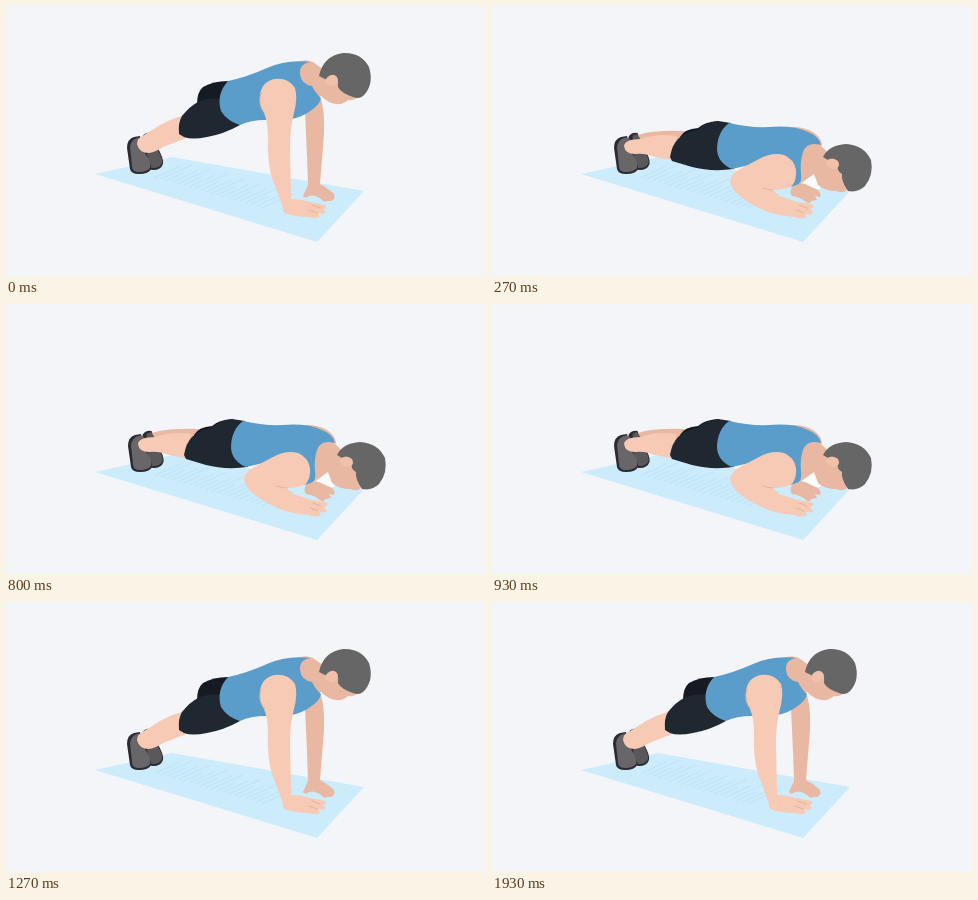
These frames come from a looping animation (480 px wide and 270 px high, 2070 ms). An HTML page:

```html
<!DOCTYPE html>
<html lang="en">
<head>
<meta charset="utf-8">
<title>Push-up</title>
<style>
  html, body { margin: 0; width: 100%; height: 100%; overflow: hidden; background: #f4f5f9; }
  svg { display: block; width: 100%; height: 100%; }
  .skin { fill: #f6cab4; }
  .shade { fill: #e9b8a2; }
  .ear { fill: #f0c1aa; }
  .shirt { fill: #5a9dca; }
  .shorts { fill: #1f2730; }
  .back { fill: #161b23; }
  .hair { fill: #666667; }
  .shoe { fill: #69666a; }
  .far { fill: #5a585b; }
  .sole { fill: #2b2b33; }
  .crease { fill: none; stroke: #e6b39c; stroke-width: 1; stroke-linecap: round; }
</style>
</head>
<body>
<svg viewBox="0 0 480 270">
  <defs>
    <g id="farShoe">
      <path class="sole" d="M136 131Q139 126 145 127L151 141Q158 152 157 158Q155 164 147 164L140 163Z"/>
      <path class="far" d="M140 130Q145 126 148 131L151 143Q157 152 156 157Q154 162 147 162L142 161Z"/>
    </g>
    <g id="nearShoe">
      <path class="sole" d="M121 142Q121 133 128 131L134 130L137 145Q146 157 145 163Q143 168 133 168Q125 168 124 163Z"/>
      <path class="shoe" d="M124 141Q125 134 131 132Q136 130 138 135Q137 144 140 149Q146 157 144 162Q141 166 133 166Q126 166 126 160Z"/>
    </g>
  </defs>

  <path d="M89 168L166 151L358 185L311 236Z" fill="#cdecfb"/>
  <g id="hatch" fill="none" stroke="#bde4f7" stroke-width="2" stroke-linecap="round" opacity=".6"></g>

  <g id="up">
    <use href="#farShoe"/>
    <use href="#nearShoe"/>
    <path class="shade" d="M299 106L315 93Q319 108 318 128L314 178Q323 183 328 188Q330 193 325 195L321 195Q318 197 315 193Q309 188 303 190Q299 193 297 190L302 179L301 150Z"/>
    <path class="back" d="M191 98Q191 86 197 81Q207 75 222 75L222 105L202 112Z"/>
    <path class="skin" d="M131 138Q131 132 138 129Q148 123 154 119Q165 113 178 109L183 131L157 141Q150 146 143 147Q133 147 131 138Z"/>
    <path class="shorts" d="M173 128Q172 116 176 110Q184 100 192 96Q202 91 215 93L234 119Q218 128 201 131Q186 134 178 131Z"/>
    <path class="shade" d="M290 57Q298 52 307 56L318 64L331 68Q337 76 341 84L351 92Q346 95 342 94Q337 99 330 98Q322 97 315 90L309 94L292 76Z"/>
    <path class="shirt" d="M222 75Q241 71 261 62Q281 53 304 56Q293 58 294 68Q295 78 306 80Q310 88 315 92Q314 98 307 103Q297 111 285 113L259 114Q245 114 234 119Q221 115 215 105Q210 88 222 75Z"/>
    <path class="hair" d="M313 70Q317 50 337 47Q355 46 363 61Q368 77 359 88Q354 94 347 91Q335 87 332 81Q333 70 328 69Q323 68 323 74Q318 73 313 70Z"/>
    <path class="ear" d="M319 77Q320 69 327 69Q333 70 331 76Q329 81 324 80Z"/>
    <path class="skin" d="M254 94Q253 77 268 73Q282 71 289 82Q292 92 288 107Q284 121 284 142L285 193Q295 193 304 196L319 199Q322 202 317 203L320 206Q318 209 312 207L314 211Q308 213 303 211Q291 211 281 208Q276 207 277 202Q272 187 266 172Q261 155 262 132Q262 116 258 107Q254 101 254 94Z"/>
    <path class="crease" d="M255 87Q251 99 259 107M306 199L314 202M303 204L311 207"/>
  </g>

  <g id="down">
    <use href="#farShoe" x=".5"/>
    <use href="#nearShoe" x="1"/>
    <path class="shade" d="M146 129Q161 124 193 125L187 144L154 143Z"/>
    <path class="back" d="M188 131Q192 123 206 122Q212 116 227 115L231 142L194 149Z"/>
    <path class="skin" d="M132 140Q133 133 149 133Q165 127 185 130L181 154Q164 152 157 149Q149 147 143 148Q133 148 132 140Z"/>
    <path class="shorts" d="M178 151Q180 139 186 133Q192 127 205 124Q213 117 226 115L239 117L242 163Q219 166 200 161L180 155Z"/>
    <path class="shade" d="M292 122Q308 119 321 126Q330 132 330 140L314 137Z"/>
    <path d="M311 174L320 168L329 177L328 183Q317 184 311 178Z" fill="#fbfcfe"/>
    <path class="shade" d="M309 141Q319 134 329 140L345 155L356 183Q352 188 344 185Q333 185 326 179L322 168L308 178Z"/>
    <path class="shade" d="M300 181Q307 176 313 178L326 184Q330 188 328 191L323 190L325 194L319 195Q318 199 314 196Q308 191 300 190Q297 187 300 181Z"/>
    <path class="shirt" d="M237 117Q258 122 277 121Q301 119 316 126Q327 130 329 139Q315 135 311 146Q308 154 309 168Q310 175 307 178L299 181Q290 160 266 157L240 163Q226 157 225 144Q225 126 237 117Z"/>
    <path class="hair" d="M331 151Q337 139 354 138Q372 139 379 154Q382 169 373 180Q366 187 356 185Q349 175 350 168Q344 165 346 157Q342 152 336 154Z"/>
    <path class="ear" d="M334 155Q340 150 346 155Q349 161 343 163Q337 163 334 158Z"/>
    <path class="skin" d="M238 175Q239 168 248 163L267 153Q280 146 292 149Q302 153 304 164Q305 173 300 180Q292 184 281 184L287 190Q297 193 305 196L320 198Q324 201 318 203L321 207Q318 210 313 207L315 211Q309 214 303 211Q288 210 276 206Q259 199 248 190Q239 183 238 175Z"/>
    <path class="crease" d="M271 182Q276 184 281 184M307 199L315 202M304 204L312 207"/>
  </g>
</svg>
<script>
  const LOOP = 2070, DROP = 270, RISE = 1270;
  const up = document.getElementById("up");
  const down = document.getElementById("down");

  // Slanted scribble along the middle of the mat
  let strokes = "";
  for (let i = 0; i < 20; i++) {
    const x = 150 + i * 5.6, y = 171 + i * 1.6;
    const len = 24 + 8 * Math.sin(i * 2.1);
    strokes += `M${x} ${y}l${len} ${-len * 0.45}`;
  }
  const line = document.createElementNS("http://www.w3.org/2000/svg", "path");
  line.setAttribute("d", strokes);
  document.getElementById("hatch").append(line);

  function draw(now) {
    const t = now % LOOP;
    const low = t >= DROP && t < RISE;
    up.style.display = low ? "none" : "";
    down.style.display = low ? "" : "none";
  }

  const start = performance.now();
  function tick() {
    draw(performance.now() - start);
    requestAnimationFrame(tick);
  }
  tick();
</script>
</body>
</html>
```
